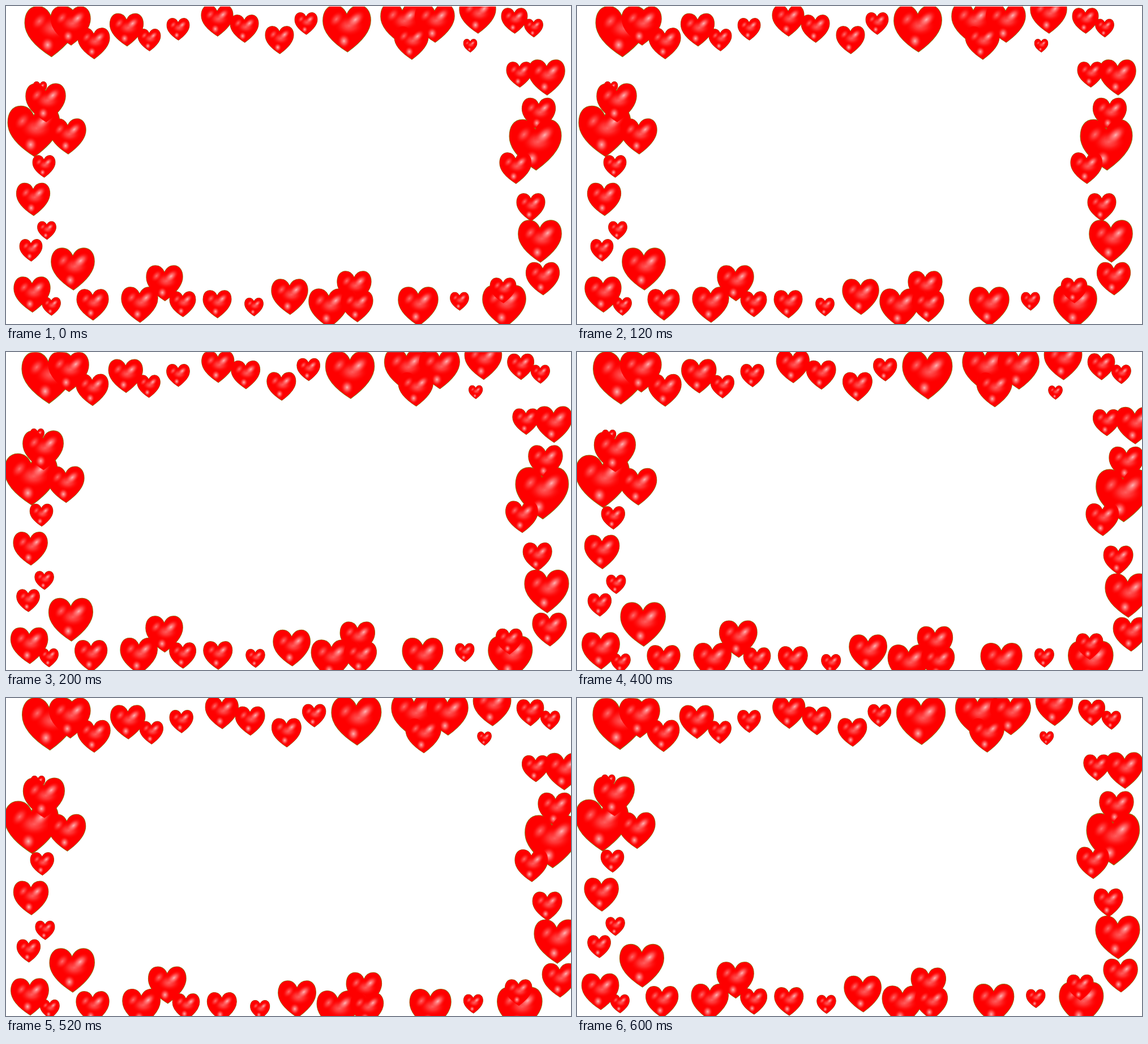
Recreate the animation shown at these times as an HTML page. Size 998 by 561 pixels, loop 0.8 s.

```html
<!DOCTYPE html>
<html>
<head>
<meta charset="utf-8">
<title>Beating heart border</title>
<style>
html, body { margin: 0; width: 100%; height: 100%; overflow: hidden; background: #fff; }
svg { display: block; width: 998px; height: 561px; }
</style>
</head>
<body>
<svg viewBox="0 0 998 561">
  <defs>
    <radialGradient id="glow">
      <stop offset="0" stop-color="#ffb4b4"/>
      <stop offset=".45" stop-color="#ff7878" stop-opacity=".6"/>
      <stop offset="1" stop-color="#ff0000" stop-opacity="0"/>
    </radialGradient>
    <clipPath id="edge"><rect x="-50" y="1" width="1100" height="620"/></clipPath>
    <!-- 100 units wide, centred on the origin -->
    <path id="shape" transform="translate(-50 -48.5)"
      d="M50 19C45 7 37 0 25 0C9 0 0 13 0 32C0 57 23 79 51.5 97C78 78 100 55 100 31C100 12 90 0 76 0C64 0 55 7 50 19Z"/>
    <use id="outline" href="#shape" stroke="#857a10" stroke-width="2.2"/>
    <g id="heart">
      <use href="#shape" fill="#fe0000"/>
      <g fill="url(#glow)">
        <ellipse cx="5" cy="-6" rx="32" ry="22" opacity=".6"/>
        <ellipse rx="25" ry="15" transform="translate(18 -19) rotate(-42)"/>
        <ellipse rx="20" ry="13" transform="translate(-22 -20) rotate(-50)" opacity=".6"/>
        <ellipse cx="-6" cy="26" rx="14" ry="16"/>
      </g>
    </g>
  </defs>
  <g id="border" clip-path="url(#edge)"></g>
</svg>
<script>
// Width shared by a group, then the heart centres; later groups lie on top.
const groups = [
  [24, [820, 70], [60, 145]],
  [59, [213, 42], [941, 191], [948, 481], [48, 341]],
  [91, [79, 45], [935, 245], [49, 221]],
  [84, [602, 40]],
  [76, [700, 31], [880, 530], [943, 415], [118, 464]],
  [70, [114, 35], [757, 30], [728, 530], [570, 533], [70, 171]],
  [64, [236, 527], [833, 17], [955, 126], [501, 513], [109, 230], [46, 509], [280, 489]],
  [60, [716, 65], [615, 497]],
  [56, [155, 66], [373, 26], [900, 286], [153, 527], [620, 530]],
  [50, [421, 40], [483, 60], [927, 355], [373, 526]],
  [46, [907, 121], [898, 26], [312, 526], [878, 502]],
  [40, [253, 60], [304, 41], [530, 31], [44, 431], [67, 283]],
  [33, [932, 39], [80, 530], [438, 531], [801, 521], [72, 396]]
];

const layer = id => groups.map(([width, ...centres]) => centres.map(([x, y]) =>
  `<use href="#${id}" transform="translate(${x} ${y}) scale(${width / 100})"/>`).join("")).join("");

// All outlines lie below all fills, so only the outer contour shows.
const border = document.getElementById("border");
border.innerHTML = layer("outline") + layer("heart");

// The beat holds rest, larger, largest, larger for 200 ms each.
function draw() {
  const step = Math.floor(performance.now() / 200) % 4;
  const swell = 2 - Math.abs(step - 2);
  const x = swell ? -5.75 : 0;
  border.setAttribute("transform", `translate(${x} ${-swell / 2}) scale(${1 + swell * 0.0188})`);
  requestAnimationFrame(draw);
}
draw();
</script>
</body>
</html>
```
